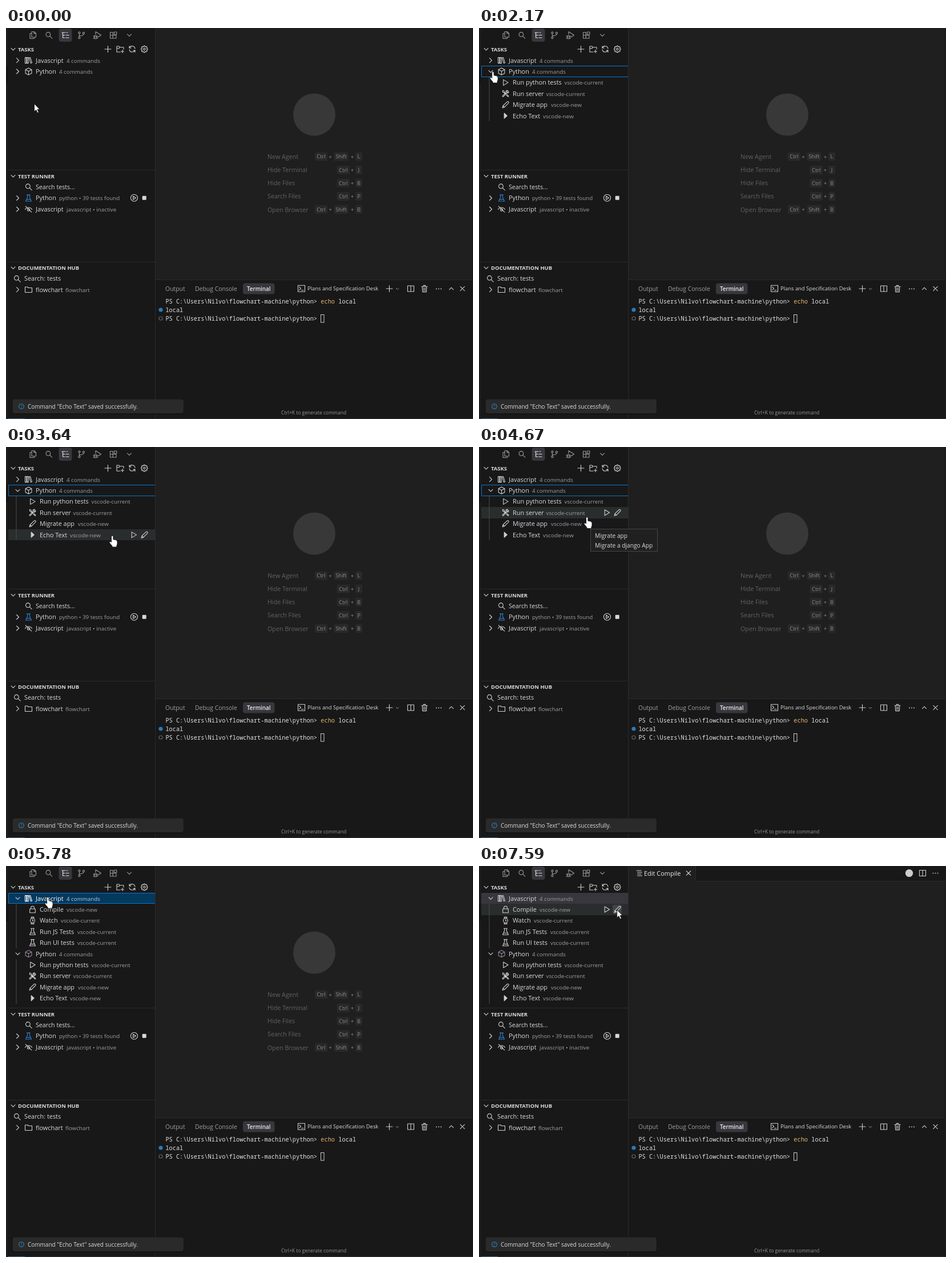
An HTML page for the animation above (8 s loop, 818 px wide and 684 px high).

```html
<!DOCTYPE html>
<html lang="en">
<head>
<meta charset="utf-8">
<title>Task tree</title>
<style>
html, body { margin: 0; width: 100%; height: 100%; overflow: hidden; background: #181818; }
svg { display: block; width: 100vw; height: 100vh; }
text { font-family: "Open Sans", "Noto Sans", sans-serif; white-space: pre; }
.mono { font-family: "Noto Sans Mono", "DejaVu Sans Mono", monospace; }
.icon { fill: none; stroke-width: 1.1; stroke-linejoin: round; stroke-linecap: round; }
</style>
</head>
<body>
<svg id="stage" viewBox="0 0 818 684">
  <g id="base"></g>
  <g id="editor"></g>
  <g id="tree"></g>
  <g id="tip"></g>
  <path id="cursor" fill="#fff" stroke="#111" stroke-width=".9" stroke-linejoin="round"/>
</svg>
<script>
const LOOP = 8000, ROW = 19.4, TOP = 46.9;
const $ = id => document.getElementById(id);

// Icon outlines, centred on 0,0
const ICONS = {
  right: 'M-2-4 2 0-2 4',
  down: 'M-3.5-1.7 0 1.8 3.5-1.7',
  up: 'M-3.5 1.7 0-1.8 3.5 1.7',
  close: 'M-3.7-3.7 3.7 3.7M3.7-3.7-3.7 3.7',
  plus: 'M-5.5 0H5.5M0-5.5V5.5',
  files: 'M-2-6H2.5L5.5-3V3.5H-2ZM2-6V-2.7H5.5M-2-3H-5V6H2.5V3.7',
  search: 'M2.8-1.2A3.9 3.9 0 1 1-5-1.2 3.9 3.9 0 1 1 2.8-1.2M1.7 1.7 5.7 5.7',
  list: 'M-6-4.5H0M-4.5-4.5V4.5H-1M-4.5 0H-1M1 0H6M1 4.5H6M2-4.5H4',
  branch: 'M-2-4A1.6 1.6 0 1 1-5.2-4 1.6 1.6 0 1 1-2-4M-2 4.5A1.6 1.6 0 1 1-5.2 4.5 1.6 1.6 0 1 1-2 4.5M5.5-3.5A1.6 1.6 0 1 1 2.3-3.5 1.6 1.6 0 1 1 5.5-3.5M-3.6-2.4V2.9M3.9-1.9Q3.9 1-1 1H-3.6',
  debug: 'M-3-1.5V-6L6.5 0 1 3.5M-5.5 2.8Q-5.5.5-3.3.5T-1.1 2.8V4.2Q-1.1 6.3-3.3 6.3T-5.5 4.2ZM-5.5 3.3H-1.1M-7 1.5-5.5 2.5M.4 1.5-1.1 2.5M-7 5.8-5.5 4.8M.4 5.8-1.1 4.8',
  blocks: 'M-5.5-5H-.8V5.5H-5.5ZM-5.5.3H5V5.5H-.8M1.4-5.5H5.8V-1.2H1.4Z',
  newFolder: 'M0 5H-6V-5H-2L-.7-3.3H6V0M-6-1.3H-2L-.7-3.3M4 1.5V6.5M1.5 4H6.5',
  refresh: 'M-4.7-2.2A5 5 0 0 1 4.9-.8M4.7 1.8A5 5 0 0 1-4.9.8M-5-5.2V-2H-1.8M5 5.2V2.2H1.8',
  gear: 'M-1-5.6H1L1.5-3.9 3.3-4.8 4.8-3.3 3.9-1.5 5.6-1V1L3.9 1.5 4.8 3.3 3.3 4.8 1.5 3.9 1 5.6H-1L-1.5 3.9-3.3 4.8-4.8 3.3-3.9 1.5-5.6 1V-1L-3.9-1.5-4.8-3.3-3.3-4.8-1.5-3.9ZM1.7 0A1.7 1.7 0 1 1-1.7 0 1.7 1.7 0 1 1 1.7 0',
  books: 'M-6-5H-3.6V5H-6ZM-2.6-5H-.2V5H-2.6ZM1-4.3 3-5 6 4.2 3.9 5Z',
  cube: 'M0-6 5.4-3.2V3.2L0 6-5.4 3.2V-3.2ZM-5.4-3.2 0-.3 5.4-3.2M0-.3V6',
  play: 'M-3.8-5 4.6 0-3.8 5Z',
  solid: 'M-2.3-4.6 2.7 0-2.3 4.6Z',
  pencil: 'M-5.5 5.5-4.4 1.8 3-5.3Q4.3-6 5.3-5T5.2-2.8L-2 4.5ZM-4.3 2-2 4.3',
  tools: 'M-5-5.5-2.6-4.6-1.8-2.2 5.5 4.4 4.4 5.5-2.7-1.7-5-2.6ZM5.3-4 3.2-2 1.9-3.2 4-5.4Q1.3-6.5.5-3.6L.8-2-5.6 4.3-4.3 5.6 2-.8Q6-.3 5.3-4Z',
  lock: 'M-4.8-1H4.8V5.7H-4.8ZM-2.9-1V-3Q-2.9-5.8 0-5.8T2.9-3V-1',
  watch: 'M4 0A4 4 0 1 1-4 0 4 4 0 1 1 4 0M0-2V.5H1.5M-2.3-3.6V-6H2.3V-3.6M-2.3 3.6V6H2.3V3.6',
  beaker: 'M-3-5.6H3M-1.8-5.6V-1.5L-5 5.5H5L1.8-1.5V-5.6M-3.6 2.4H3.6',
  eyeOff: 'M-6 .5Q-4-3 0-3T6 .5M2 1A2 2 0 1 1-2 1 2 2 0 1 1 2 1M-5.3-5.2 5.3 5.2',
  folder: 'M-6-4.7H-1.8L-.4-3.2H6V4.8H-6Z',
  terminal: 'M-6-5.5H6V5.5H-6ZM-3.7-2.7-1 0-3.7 2.7M0 3H3.5',
  split: 'M-5.5-5H5.5V5H-5.5ZM0-5V5',
  trash: 'M-5-3.7H5M-1.7-3.7V-5.6H1.7V-3.7M-3.8-3.7-3.3 5.6H3.3L3.8-3.7M-1.2-1.5V3.4M1.2-1.5V3.4',
  dots: 'M-4.2 0H-3.9M-.1 0H.1M3.9 0H4.2',
  runAll: 'M6 0A6 6 0 1 1-6 0 6 6 0 1 1 6 0M-1.8-3 3 0-1.8 3Z',
  lines: 'M-5-4.5H3M-3.5-1.5H4.5M-3.5 1.5H3M-3.5 4.5H4.5'
};
const ICON_STYLE = { solid: 'fill:#d0d0d0', dots: 'stroke-width:1.7' };
const HAND = 'M-2 1.8A1.7 1.7 0 0 1 1.4 1.8V6.6L5.7 7.5Q8.5 8.2 8.5 10.8V14Q8.5 16 7.4 17.4V20H-.6V18.2L-4.9 13Q-6 11-4.7 10.4-3.4 10-2 11.6Z';
const ARROW = 'M0 0V13.7L3.2 10.8 5.6 16 7.8 15 5.5 9.9H9.6Z';

const FG = '#dadada', DIM = '#9f9f9f', LINE = '#2b2b2b';

// Baselines snap to whole pixels
const text = (x, y, s, size = 10.9, fill = FG, more = '') =>
  `<text x="${x}" y="${Math.round(y)}" font-size="${size}" fill="${fill}" ${more}>${s}</text>`;
const rect = (x, y, w, h, fill, more = '') =>
  `<rect x="${x}" y="${y}" width="${w}" height="${h}" fill="${fill}" ${more}/>`;
const icon = (name, x, y, color = '#d0d0d0') =>
  `<path class="icon" d="${ICONS[name]}" transform="translate(${x} ${y})" stroke="${color}" style="${ICON_STYLE[name] || ''}"/>`;
const circle = (x, y, r, fill, more = '') => `<circle cx="${x}" cy="${y}" r="${r}" fill="${fill}" ${more}/>`;

const header = (y, s) => icon('down', 12.5, y) + text(21, y + 3.5, s, 9.45, FG, 'font-weight="700"');
const entry = (y, glyph, label, x, desc, color) =>
  icon('right', 20.5, y) + icon(glyph, 39.5, y, color) + text(52, y + 3.9, label) + text(x, y + 3.9, desc, 9.8, DIM);

function drawBase() {
  const path = 'PS C:\\Users\\Nilvo\\flowchart-machine\\python&gt;';
  const mono = (x, y, s, fill = '#e2e2e2') => text(x, y, s, 10.31, fill, 'class="mono"');
  const bar = [['files', 47], ['search', 75], ['list', 104], ['branch', 132], ['debug', 160], ['blocks', 188], ['down', 216]];
  $('base').innerHTML =
    rect(0, 0, 818, 684, '#181818') + rect(0, 0, 3.5, 684, '#1d1d1d') + rect(0, 66, 3.5, 31, '#151515') +
    rect(262, 0, 556, 440, '#1f1f1f') +
    rect(261, 0, 1, 684, LINE) + rect(262, 440, 556, 1, LINE) +
    rect(4, 248, 257, 1, LINE) + rect(4, 409, 257, 1, LINE) +
    rect(816, 0, 2, 684, '#1a1a1a') + rect(0, 683, 818, 1, LINE) + rect(4, 683, 29, 1, '#3a6f92') +
    rect(92.5, 1, 23, 23, '#37373d', 'rx="4"') +
    bar.map(([n, x]) => icon(n, x, 12.5, n === 'list' ? '#e4e4e4' : '#9a9a9a')).join('') +
    header(37, 'TASKS') +
    icon('plus', 178.5, 37) + icon('newFolder', 200, 37) + icon('refresh', 221, 37) + icon('gear', 242.3, 37) +
    header(259, 'TEST RUNNER') + icon('search', 39.5, 278) + text(52, 282, 'Search tests...', 10.7) +
    entry(297.5, 'beaker', 'Python', 93, 'python • 39 tests found', '#2f7fd0') +
    icon('runAll', 224.5, 297.2) + rect(238.7, 293.7, 7, 7, '#d8d8d8', 'rx="1"') +
    entry(317, 'eyeOff', 'Javascript', 106, 'javascript • inactive') +
    header(419.5, 'DOCUMENTATION HUB') + icon('search', 19.5, 438.5) + text(32, 442.3, 'Search: tests') +
    entry(457.7, 'folder', 'flowchart', 104, 'flowchart') +
    rect(415, 446.5, 55.5, 19, '#37373d', 'rx="4"') +
    text(279, 460, 'Output', 10.45, DIM) + text(331, 460, 'Debug Console', 10.45, DIM) +
    text(422, 460, 'Terminal', 9.8, '#eee', 'font-weight="600"') +
    icon('terminal', 517.5, 455.7) + text(528, 459.4, 'Plans and Specification Desk', 9.4) +
    icon('plus', 671.5, 456) + `<g transform="translate(685.5 456.5) scale(.65)">${icon('down', 0, 0)}</g>` +
    icon('split', 709, 456) + icon('trash', 733, 456) + icon('dots', 758, 456.3) + icon('up', 780, 456) + icon('close', 799.5, 456) +
    mono(279.4, 482, path) + mono(551.3, 482, 'echo', '#e5b56f') + mono(582.3, 482, 'local') +
    mono(279.4, 497, 'local') + mono(279.4, 512, path) +
    circle(271, 493, 3.6, '#2a7ab8') + circle(271, 508, 3, 'none', 'stroke="#666" stroke-width="1.2"') +
    rect(551.5, 501.5, 5.5, 13.5, 'none', 'stroke="#ccc"') +
    text(482, 676, 'Ctrl+K to generate command', 8.5, '#969696') +
    rect(10, 649, 302, 27, '#141414', 'rx="5"') + rect(11.5, 649.5, 299.5, 24.5, '#2a2a2a', 'rx="4"') +
    circle(27, 662, 4.3, 'none', 'stroke="#2f86c8" stroke-width="1.1"') +
    text(27, 664.8, '?', 7.5, '#2f86c8', 'text-anchor="middle"') +
    text(38, 666, 'Command "Echo Text" saved successfully.', 9.97);
}

function welcome() {
  const key = (x, w, y, s) => rect(x, y - 7.5, w, 15, '#292929', 'rx="2"') +
    text(x + w / 2, y + 3.4, s, 9.3, '#8e8e8e', 'text-anchor="middle"');
  const plus = (x, y) => text(x, y + 3.6, '+', 9.8, '#8e8e8e', 'text-anchor="middle"');
  const rows = [['New Agent', 'L', 1], ['Hide Terminal', 'J'], ['Hide Files', 'B'], ['Search Files', 'P'], ['Open Browser', 'B', 1]];
  return circle(540, 151.5, 37, '#383838') + rows.map(([label, k, shift], i) => {
    const y = 225 + i * 23.15;
    return text(458, y + 4, label, 10.75, '#626262') + key(612, 12, y, k) + plus(606.5, y) +
      (shift ? key(541, 22, y, 'Ctrl') + plus(568, y) + key(574.5, 25, y, 'Shift') : key(579.5, 22.5, y, 'Ctrl'));
  }).join('');
}

const editTab = () =>
  rect(380, 0, 438, 27, '#181818') + rect(379, 0, 1, 27, LINE) + rect(380, 26, 438, 1, LINE) +
  icon('lines', 281, 12.5) + text(289, 16.7, 'Edit Compile', 10.95, '#eee') + icon('close', 367, 12.5, '#ddd') +
  circle(753.5, 12.5, 6.7, '#ccc') + icon('split', 777, 12.5) + icon('dots', 799.5, 12.5);

const JS = [['lock', 'Compile', 106, 'new'], ['watch', 'Watch', 96, 'current'],
  ['beaker', 'Run JS Tests', 125, 'current'], ['beaker', 'Run UI tests', 125, 'current']];
const PY = [['play', 'Run python tests', 149.5, 'current'], ['tools', 'Run server', 117.5, 'current'],
  ['pencil', 'Migrate app', 126, 'new'], ['solid', 'Echo Text', 112, 'new']];

function treeMarkup(s) {
  const rows = [{ group: 'js' }, ...(s.jsOpen ? JS : []), { group: 'py' }, ...(s.pyOpen ? PY : [])];
  return rows.map((row, i) => {
    const edge = n => Math.round(TOP + n * ROW);
    const top = edge(i), end = edge(i + 1), y = TOP + (i + .5) * ROW;
    const band = fill => rect(4, top, 257, end - top, fill);
    if (row.group) {
      const js = row.group === 'js', focused = s.focus === row.group;
      const lit = js && focused;
      return (lit ? band('#04395e') : js && s.tab ? band('#37373d') : '') +
        (focused ? `<path d="M261 ${top + .5}H4.5V${end - .5}H261" fill="none" stroke="#0b76cb"/>` : '') +
        icon((js ? s.jsOpen : s.pyOpen) ? 'down' : 'right', 20.5, y) +
        icon(js ? 'books' : 'cube', 39.5, y, lit ? '#fff' : !js && s.jsOpen ? '#96869f' : '#d0d0d0') +
        text(52, y + 4, js ? 'Javascript' : 'Python', 10.9, lit ? '#fff' : FG) +
        text(js ? 106 : 93, y + 4, '4 commands', 9.75, lit ? '#bccbd6' : DIM);
    }
    const [glyph, label, x, where] = row;
    return (s.hover === i ? band('#2a2d2e') +
        (s.onButton ? rect(234, y - 8, 16, 16, '#414445', 'rx="3"') : '') +
        icon('play', 224, y) + icon('pencil', 242.5, y) : '') +
      rect(17.5, top, 1, end - top, '#4a4a4a') + icon(glyph, 46.5, y) +
      text(59, y + 4, label) + text(x, y + 4, 'vscode-' + where, 9.8, DIM);
  }).join('');
}

const tooltip = () =>
  rect(195.5, 143.5, 117, 39, '#202020', 'stroke="#454545"') +
  text(203, 158.8, 'Migrate app', 10.2) + text(203, 175.8, 'Migrate a django App', 10.2);

// Pointer track: time, x, y
const TRACK = [[330, 49.5, 132.5], [1030, 24, 76], [2170, 24.5, 76], [2590, 118, 122], [2940, 175, 98],
  [3010, 178, 104], [3640, 186.5, 155], [3780, 187.5, 160], [3840, 187.5, 160], [4120, 193, 139],
  [4540, 194.5, 134], [4650, 189.5, 122.5], [4690, 189.5, 122.5], [5160, 79, 43], [5300, 72, 52], [5570, 72, 52],
  [5780, 73.5, 54], [6200, 97, 90], [6410, 111, 100], [6550, 115.5, 96], [7240, 226, 79], [7450, 241.7, 76.7]];

function pointer(t) {
  const i = TRACK.findIndex(k => k[0] > t);
  if (i === 0) return TRACK[0].slice(1);
  if (i < 0) return TRACK[TRACK.length - 1].slice(1);
  const [t0, x0, y0] = TRACK[i - 1], [t1, x1, y1] = TRACK[i];
  const k = (t - t0) / (t1 - t0);
  return [x0 + (x1 - x0) * k, y0 + (y1 - y0) * k];
}

const shown = {};
function put(id, key, make) {
  if (shown[id] === key) return;
  shown[id] = key;
  $(id).innerHTML = make();
}

function render(t) {
  const [x, y] = pointer(t);
  const tab = t >= 7450, tip = t >= 4400 && t < 4740;
  const state = {
    pyOpen: t >= 1770, jsOpen: t >= 5370, tab,
    focus: t < 1570 || tab ? '' : t < 5370 ? 'py' : 'js',
    hover: Math.floor((y - TOP) / ROW),
    onButton: x > 234
  };
  put('tree', JSON.stringify(state), () => treeMarkup(state));
  put('editor', tab, tab ? editTab : welcome);
  put('tip', tip, () => tip ? tooltip() : '');
  $('cursor').setAttribute('d', t < 930 || t >= 7310 ? ARROW : HAND);
  $('cursor').setAttribute('transform', `translate(${x.toFixed(1)} ${y.toFixed(1)})`);
}

drawBase();
const begin = performance.now();
function frame() {
  render((performance.now() - begin) % LOOP);
  requestAnimationFrame(frame);
}
frame();
</script>
</body>
</html>
```
